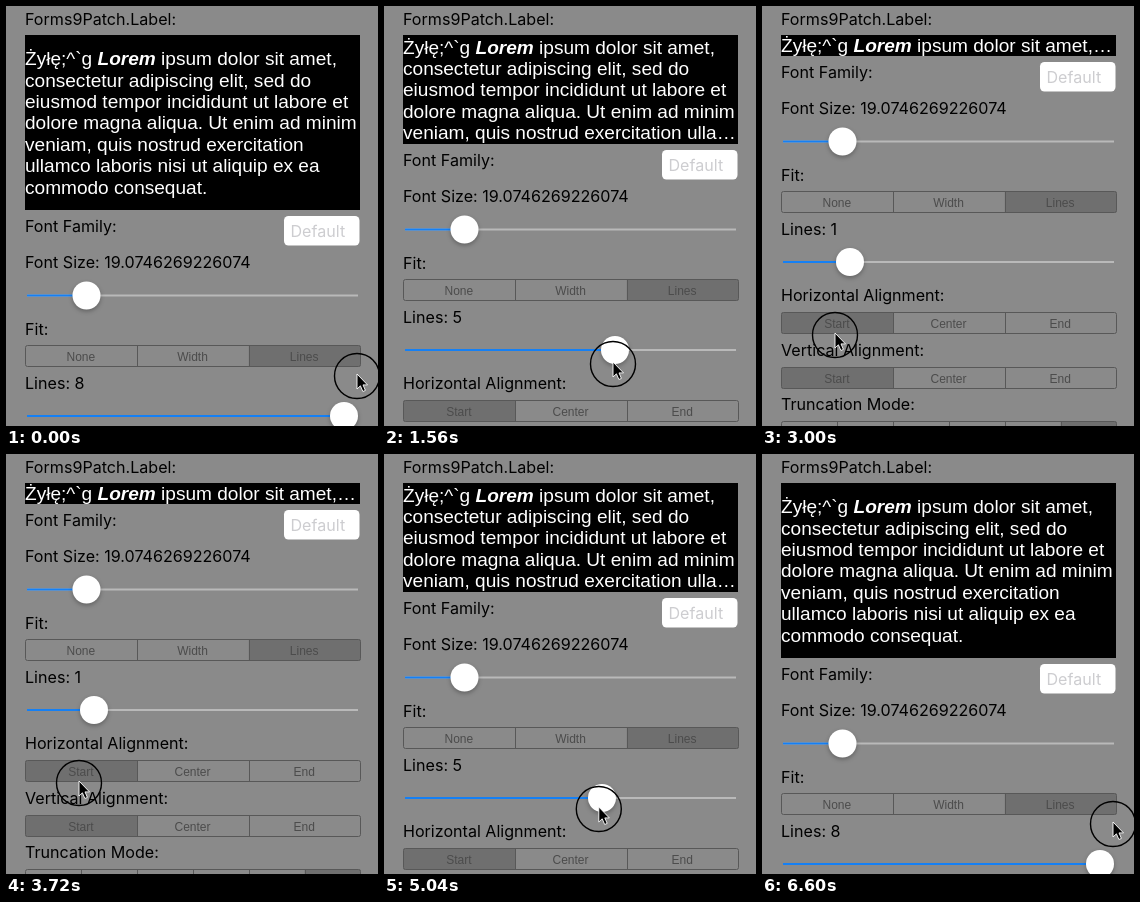
An HTML page that plays this animation: 372 px wide and 420 px high, repeating every 6.72 s.

```html
<!DOCTYPE html>
<html lang="en">
<head>
<meta charset="utf-8">
<title>Label line fitting</title>
<style>
  html, body { margin: 0; width: 100%; height: 100%; overflow: hidden; background: #8a8a8a; }
  svg { display: block; }
  text { white-space: pre; }
  .ui { font: 16.1px Inter, sans-serif; }
  .seg { font: 12px "Liberation Sans", Arial, sans-serif; fill: #4c4c4c; text-anchor: middle; }
  #label { font: 19.07px "Liberation Sans", Arial, sans-serif; fill: #fff; }
  .thumb { fill: #fff; filter: drop-shadow(0 2px 2px rgba(0, 0, 0, .28)); }
</style>
</head>
<body>
<svg width="372" height="420" viewBox="0 0 372 420">
  <text class="ui" x="19" y="19">Forms9Patch.Label:</text>
  <rect id="box" x="19" y="29" width="335" fill="#000"/>
  <g id="label"></g>
  <g id="form"></g>
  <g id="cursor">
    <circle r="22.5" fill="none" stroke="#000" stroke-width="1.4"/>
    <path d="M0-2V13L3.4 9.8L5.9 15.5L8.4 14.4L6 8.9H10.5Z" fill="#000" stroke="#fff" stroke-width=".9"/>
  </g>
</svg>
<script>
const STEP = 120, HALF = 28, LINE = 21.45;
const $ = id => document.getElementById(id);

// Each line: full text, characters dropped when it is truncated, replacement tail
const lines = [
  [" ipsum dolor sit amet,", 0, "…"],
  ["consectetur adipiscing elit, sed do", 0, " ei…"],
  ["eiusmod tempor incididunt ut labore et", 3, "…"],
  ["dolore magna aliqua. Ut enim ad minim", 1, "…"],
  ["veniam, quis nostrud exercitation", 0, " ulla…"],
  ["ullamco laboris nisi ut aliquip ex ea", 0, " c…"],
  ["commodo consequat.", 0, ""]
];
const opening = 'Żyłę;^`g <tspan font-weight="bold" font-style="italic">Lorem</tspan>';
$("label").innerHTML = lines.map((_, i) =>
  `<text x="19">${i ? "" : opening}<tspan class="tail"></tspan></text>`).join("");
const rows = [...$("label").children];
const tails = document.querySelectorAll(".tail");

const caption = (y, text, id = "") =>
  `<text class="ui" x="19" y="${y + 6}" id="${id}">${text}</text>`;

const slider = (y, x, id) => `
  <path d="M21 ${y}H352" stroke="#b9b9b9" stroke-width="2"/>
  <path id="${id}Fill" d="M21 ${y}H${x}" stroke="#1580f5" stroke-width="2"/>
  <circle id="${id}Thumb" class="thumb" cx="${x}" cy="${y}" r="14"/>`;

function segments(y, names, selected) {
  const w = 335 / names.length;
  return `<rect x="${19.5 + selected * w}" y="${y}" width="${w}" height="21" fill="#6f6f6f"/>
    <rect x="19.5" y="${y}" width="335" height="21" rx="2" fill="none" stroke="#585858"/>` +
    names.map((name, i) => {
      const x = 19.5 + i * w;
      return (i ? `<path d="M${Math.round(x) + .5} ${y}v21" stroke="#585858"/>` : "") +
        `<text class="seg" x="${x + w / 2 - .5}" y="${y + 15}">${name}</text>`;
    }).join("");
}

const align = ["Start", "Center", "End"];
$("form").innerHTML =
  caption(16, "Font Family:") +
  `<rect x="278" y="6" width="75.5" height="29.5" rx="4.5" fill="#fff"/>
   <text class="ui" x="284.5" y="26.5" fill="#cdcdd0">Default</text>` +
  caption(52, "Font Size: 19.0746269226074") + slider(85.5, 80.5, "size") +
  caption(119, "Fit:") + segments(135.5, ["None", "Width", "Lines"], 2) +
  caption(173, "", "count") + slider(206, 338, "lines") +
  caption(239, "Horizontal Alignment:") + segments(256.5, align, 0) +
  caption(294, "Vertical Alignment:") + segments(311.5, align, 0) +
  caption(348, "Truncation Mode:") + segments(365.5, Array(6).fill(""), 5);

// Key points: [step, value]
const thumbX = [[4, 338], [5, 332], [9, 284], [13, 231], [18, 166], [21, 130.5], [25, 88], [28, 66]];
const cursorX = [[1, 351], [3, 350], [4, 350], [5, 344], [9, 290], [13, 229], [18, 158], [21, 118], [25, 73], [28, 48]];
const cursorY = [[1, 370], [3, 371], [4, 371], [9, 368], [13, 358], [18, 343], [21, 337], [25, 329], [28, 325]];

function at(keys, k) {
  const i = keys.findIndex(key => key[0] >= k);
  if (i < 1) return keys[0][1];
  const [k0, v0] = keys[i - 1], [k1, v1] = keys[i];
  return v0 + (v1 - v0) * (k - k0) / (k1 - k0);
}

function draw(k) {
  const x = at(thumbX, k);
  const count = Math.round((x - 36) / 37.75 + .02);
  const shown = Math.min(count, lines.length);
  const height = 22 * count - 1;
  const top = 46.7 + (height - LINE * shown) / 2;

  $("box").setAttribute("height", height);
  rows.forEach((row, i) => {
    const [full, drop, end] = lines[i];
    const cut = i === shown - 1 && count < lines.length;
    row.style.display = i < shown ? "" : "none";
    row.setAttribute("y", top + i * LINE);
    tails[i].textContent = cut ? full.slice(0, full.length - drop) + end : full;
  });

  $("form").setAttribute("transform", `translate(0 ${29 + height})`);
  $("count").textContent = "Lines: " + count;
  $("linesFill").setAttribute("d", `M21 206H${x}`);
  $("linesThumb").setAttribute("cx", x);
  $("cursor").setAttribute("transform", `translate(${at(cursorX, k)} ${at(cursorY, k)})`);
}

// The drag runs to the left and then back along the same steps
const start = performance.now();
function tick() {
  const k = Math.floor((performance.now() - start) / STEP) % (2 * HALF);
  draw(k > HALF ? 2 * HALF - k : k);
  requestAnimationFrame(tick);
}
tick();
</script>
</body>
</html>
```
